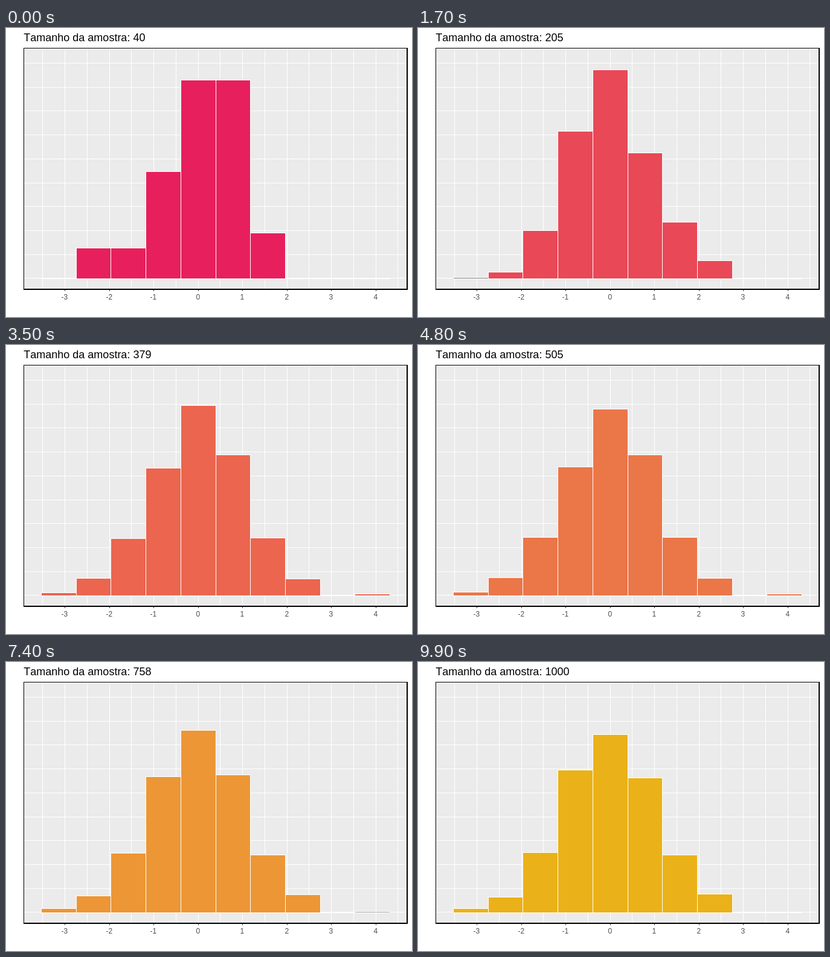
Write an HTML page that moves like this. It is 672x480 px and loops after 10000 ms.

```html
<!DOCTYPE html>
<html lang="pt">
<head>
<meta charset="utf-8">
<style>
  html, body { margin: 0; width: 100%; height: 100%; overflow: hidden; background: #fff; }
  svg { display: block; font-family: "Liberation Sans", Arial, sans-serif; font-kerning: none; }
  rect { shape-rendering: crispEdges; }
</style>
</head>
<body>
<svg id="plot" width="672" height="480" viewBox="0 0 672 480">
  <text id="title" x="29.3" y="22" font-size="18"></text>
  <g id="grid"></g>
  <g id="bars"></g>
  <g id="frame"></g>
</svg>
<script>
const FRAMES = 100, FRAME_MS = 100, BASE = 416, AREA = 1016;

// Bin counts of each sample, with the step at which it is reached
const samples = [
  { at: 0, n: 40, counts: [0, 2, 2, 7, 13, 13, 3, 0, 0, 0] },
  { at: 6, n: 100, counts: [0, 0, 7, 26, 36, 19, 9, 3, 0, 0] },
  { at: 37, n: 400, counts: [2, 12, 38, 82, 123, 93, 38, 11, 0, 1] },
  { at: 99, n: 1000, counts: [7, 25, 98, 233, 291, 220, 94, 30, 1, 1] }
];

const $ = id => document.getElementById(id);
const rect = (x, y, w, h, fill) =>
  `<rect x="${x}" y="${y}" width="${w}" height="${h}" fill="${fill}"/>`;
const edge = i => Math.floor(58.5 + 57.72 * i);

function drawPanel() {
  let grid = rect(30, 34, 634, 400, "#ebebeb");
  let frame = rect(29, 33, 635, 1, "#000") + rect(29, 33, 1, 401, "#000") +
    rect(663, 33, 2, 402, "#000") + rect(29, 433, 636, 2, "#000");
  for (let i = 0; i < 10; i++)
    grid += rect(30, Math.floor(58.3 + 39.74 * i), 634, 1, "#fff");
  for (let i = 0; i < 17; i++) {
    const x = Math.floor(60.9 + 36.74 * i);
    grid += rect(x, 34, 1, 400, "#fff");
    if (i % 2) {
      frame += rect(x, 435, 1, 2, "#333") +
        `<text x="${x - 0.2}" y="451" font-size="12" fill="#4d4d4d" text-anchor="middle">${(i - 7) / 2}</text>`;
    }
  }
  $("grid").innerHTML = grid;
  $("frame").innerHTML = frame;
}

function drawBars(step) {
  const k = samples.findIndex(s => s.at > step);
  const b = samples[k < 0 ? samples.length - 1 : k];
  const a = samples[samples.indexOf(b) - 1];
  const u = (step - a.at) / (b.at - a.at);
  const progress = step / (FRAMES - 1);
  const color = `color-mix(in lab, #e71f5d, #eab218 ${progress * 100}%)`;
  const grey = Math.round(110 + 0.7 * step);

  $("title").textContent = "Tamanho da amostra: " + Math.round(40 + 960 * progress);
  $("bars").innerHTML = a.counts.map((count, i) => {
    const height = AREA * (count / a.n * (1 - u) + b.counts[i] / b.n * u);
    const top = Math.min(BASE, Math.floor(BASE + 0.2 - height));
    const x = edge(i), w = edge(i + 1) - x, inner = BASE - top - 1;
    let bar = rect(x, top, w + 1, BASE - top + 1, "#fff");
    // One-pixel slivers lose their hue
    if (inner > 0)
      bar += rect(x + 1, top + 1, w - 1, inner, inner > 1 ? color : `rgb(${grey},${grey},${grey})`);
    return bar;
  }).join("");
}

let shown = -1;
const start = performance.now();
function tick() {
  const step = Math.floor((performance.now() - start) / FRAME_MS) % FRAMES;
  if (step !== shown) drawBars(shown = step);
  requestAnimationFrame(tick);
}
drawPanel();
tick();
</script>
</body>
</html>
```
